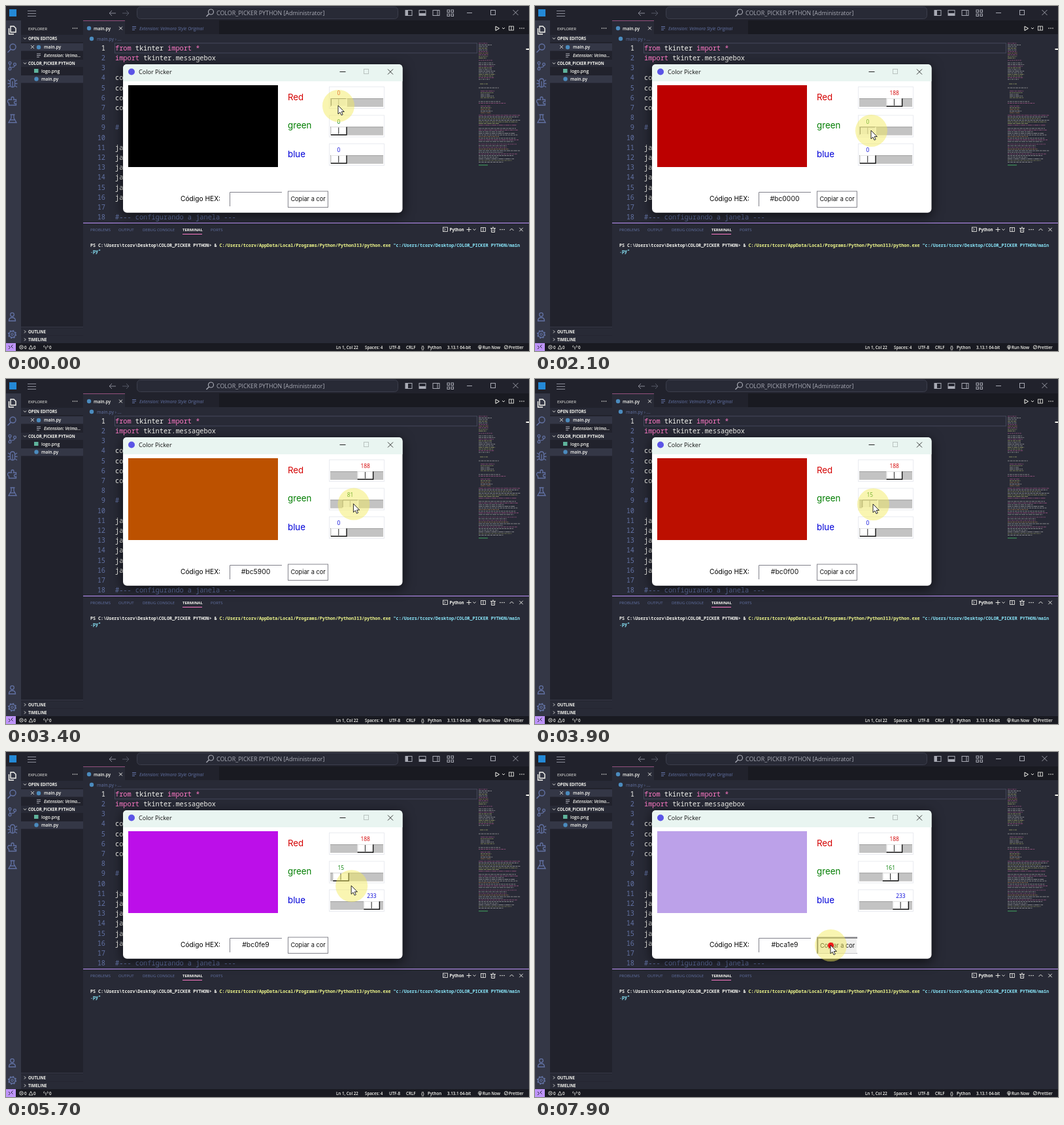
Write an HTML page that moves like this. It is 800x527 px and loops after 8000 ms.

```html
<!DOCTYPE html>
<html lang="pt">
<head>
<meta charset="utf-8">
<title>Color Picker</title>
<style>
html,body{margin:0;width:100%;height:100%;overflow:hidden;background:#282a36}
svg{display:block;width:100vw;height:100vh}
text{font-family:"Open Sans","Noto Sans",sans-serif;white-space:pre}
.mono{font-family:"Noto Sans Mono","DejaVu Sans Mono",monospace}
.app{font-family:Inter,sans-serif}
.s{font-weight:600}
.b{font-weight:700}
.i{font-style:italic}
.m{text-anchor:middle}
.e{text-anchor:end}
</style>
</head>
<body>
<svg id="stage" viewBox="0 0 800 527"></svg>
<script>
const FG = '#f8f8f2', DIM = '#6272a4', PINK = '#ff79c6', PURPLE = '#bd93f9',
      BLACK = '#191a21', DARK = '#21222c', EDITOR = '#282a36', ROW = '#343746', GREY = '#a9abb5';
const stage = document.getElementById('stage');

const rect = (x, y, w, h, fill, extra = '') =>
  `<rect x="${x}" y="${y}" width="${w}" height="${h}" fill="${fill}" ${extra}/>`;
const frame = (x, y, w, h, stroke, extra = '') => rect(x, y, w, h, 'none', `stroke="${stroke}" ${extra}`);
const text = (x, y, s, size, fill = FG, cls = '') =>
  `<text x="${x}" y="${y}" font-size="${size}" fill="${fill}" class="${cls}">${s}</text>`;
const line = (d, stroke, w = 1, extra = '') =>
  `<path d="${d}" fill="none" stroke="${stroke}" stroke-width="${w}" ${extra}/>`;
const disc = (x, y, r, fill, extra = '') => `<circle cx="${x}" cy="${y}" r="${r}" fill="${fill}" ${extra}/>`;
const ring = (x, y, r, stroke, w = 1) => disc(x, y, r, 'none', `stroke="${stroke}" stroke-width="${w}"`);
const cross = (x, y, r, stroke, w = .9) =>
  line(`M${x - r} ${y - r}l${2 * r} ${2 * r}m0 ${-2 * r}l${-2 * r} ${2 * r}`, stroke, w);
const dots = (x, y, fill = FG) => [-3, 0, 3].map(d => disc(x + d, y, .8, fill)).join('');
const chevron = (x, y) => line(`M${x - 2} ${y - 1}l2 2 2-2`, FG, .9);
const split = (x, y) => frame(x - 3.5, y - 3, 7, 6, FG, 'stroke-width=".8"') + line(`M${x} ${y - 3}v6`, FG, .8);
const pyIcon = (x, y) => disc(x, y, 3.2, '#4b8bbe');

function titleBar() {
  return rect(0, 0, 800, 22, DARK) + rect(5, 5, 11, 11, '#2489d6') +
    line('M33 7.5h13M33 11.5h13M33 15.5h13', '#8a8c98') +
    line('M168 11h-10m4-4l-4 4 4 4', '#8a8c98') + line('M178 11h10m-4-4l4 4-4 4', '#555866') +
    rect(200.5, 1.5, 399, 18, EDITOR, 'rx="5" stroke="#3c3e4c"') +
    ring(313.5, 9, 4, GREY, 1.2) + line('M310.5 12l-4 4', GREY, 1.4) +
    text(322, 14.3, 'COLOR_PICKER PYTHON [Administrator]', 8.9, GREY) +
    [611, 632, 653].map(x => frame(x, 6.5, 10, 8, GREY)).join('') +
    rect(611, 6.5, 4, 8, GREY) + rect(632, 11, 10, 4, GREY) + line('M660 6.5v8', GREY) +
    [[675, 6], [681, 6], [675, 12], [681, 12]].map(p => frame(p[0], p[1], 3.5, 3.5, GREY)).join('') +
    line('M705 10.5h8', GREY) + frame(741.5, 6.5, 7, 7, GREY) + cross(779.5, 10, 4, GREY);
}

function activityBar() {
  return rect(0, 22, 23, 493, ROW) +
    line('M7 31h5l3 3v6h-8zM4.500 34v9h7.500', FG, 1.4) +
    ring(10.5, 62.5, 4.5, DIM, 1.4) + line('M7.500 66l-5 5', DIM, 1.6) +
    ring(6, 87, 1.9, DIM, 1.2) + ring(6, 96, 1.9, DIM, 1.2) + ring(13.5, 89, 1.9, DIM, 1.2) +
    line('M6 89v5M13.500 91q0 3-7 3', DIM, 1.2) +
    line('M6.500 115q0-4 3.500-4t3.500 4v5q0 4-3.500 4t-3.500-4zM3 113l3 2m11-2l-3 2M2.500 118.500h4m7 0h4M3 124l3-2m11 2l-3-2M10 115v9', DIM, 1.3) +
    line('M4.500 143h4q-1.500-4 1.500-4t1.500 4h4v3q-3-1-3 1.500t3 1.500v2.500h-11v-3q-2-1-2-3t2-3z', DIM, 1.3) +
    line('M6.500 166h7m-5.500 0v5l-4 7h12l-4-7v-5m-6 8h8', DIM, 1.3) +
    ring(9.5, 471.5, 2.8, DIM, 1.3) + line('M4.500 481q0-5 5-5t5 5z', DIM, 1.3) +
    ring(9.5, 501.5, 4.7, DIM, 1.5) + ring(9.5, 501.5, 1.7, DIM, 1.1) +
    disc(9.5, 501.5, 5.8, 'none', `stroke="${DIM}" stroke-width="1.6" stroke-dasharray="2.2 2.35"`);
}

function sideBar() {
  const header = (y, s, open) => rect(23, y - 8, 95, 11, EDITOR) +
    (open ? chevron(29, y - 2.5) : line(`M28 ${y - 4.5}l2 2-2 2`, FG, .9)) + text(34, y, s, 6.1, FG, 'b');
  return rect(23, 22, 95, 493, DARK) + text(34, 36.5, 'EXPLORER', 6) + dots(105.5, 34) +
    rect(23, 57, 95, 11.5, ROW) + rect(23, 106, 95, 11.5, ROW) +
    header(52, 'OPEN EDITORS', 1) + cross(40.5, 62.5, 2.3, FG) + pyIcon(50, 63) +
    text(58, 65.3, 'main.py', 6.8, FG, 's') + line('M47 73h6M47 75.500h6M47 78h4', GREY) +
    text(58, 77.6, 'Extension: Velmo...', 6.6, FG, 'i s') +
    header(90, 'COLOR_PICKER PYTHON', 1) + rect(43, 96, 6.5, 6, '#5fb49c') +
    text(54, 102, 'logo.png', 6.8, FG, 's') + pyIcon(46.5, 111.5) + text(54, 114, 'main.py', 6.8, FG, 's') +
    line('M23 490.500h95M23 502.700h95', '#44475a', .7) + header(500, 'OUTLINE') + header(512, 'TIMELINE');
}

function minimap() {
  let seed = 7, out = '';
  const rand = () => (seed = seed * 16807 % 2147483647) / 2147483647;
  // [top, bottom, longest row, indent]
  const blocks = [[57, 60, 22, 0], [62, 80, 15, 0], [83, 84, 24, 0], [87, 112, 26, 0], [119, 120, 12, 2],
    [125, 126, 38, 0], [130, 141, 22, 3], [146, 150, 48, 0], [153, 163, 22, 3], [167, 184, 66, 0],
    [187, 208, 65, 0], [211, 239, 64, 0]];
  for (const [top, bottom, long, indent] of blocks)
    for (let y = top, n = 0; y <= bottom; y += 2.5, n++) {
      const w = long > 60 && n % 3 == 2 ? 25 + rand() * 30 : long * (.65 + rand() * .35);
      out += line(`M${723 + indent} ${y}h${w}`, [FG, '#f1fa8c', FG, '#ffb86c', PINK][rand() * 5 | 0], 1,
        `stroke-dasharray="${2 + rand() * 5} 1 ${1 + rand() * 3} 1" opacity=".45"`);
    }
  return out + line('M723 243h14', '#50fa7b', 1, 'opacity=".6"') + rect(795.5, 65, 4.5, 2, FG);
}

function editor() {
  const kw = s => `<tspan fill="${PINK}">${s}</tspan>`;
  const code = { 1: kw('from') + ' tkinter ' + kw('import *'), 2: kw('import') + ' tkinter.messagebox',
    9: '#', 18: '#--- configurando a janela ---' };
  let out = rect(118, 22, 682, 310, EDITOR) + rect(182, 22, 618, 21, BLACK) + rect(182, 22, 144, 21, DARK) +
    line('M118 22.500h64', PINK, 1, 'opacity=".5"') +
    pyIcon(127, 34) + text(134, 37, 'main.py', 6.8, FG, 's') + cross(175.5, 34, 2.4, FG) +
    line('M193 31.500h6M193 34h6M193 36.500h4', DIM) +
    text(204, 37, 'Extension: Velmora Style Original', 6.8, DIM, 'i') +
    line('M749 31v6.500l5.500-3.250z', FG) + chevron(761, 34) + split(773, 34) + dots(789, 34) +
    pyIcon(131, 50) + text(139, 52.7, 'main.py › ...', 7, DIM) + frame(166.5, 56.8, 554, 15, '#44475a');
  for (let n = 1; n <= 18; n++) {
    const y = 67.9 + (n - 1) * 15.19;
    const s = code[n] || (n > 3 && n < 8 ? 'co' : n > 10 && n < 17 ? 'ja' : '');
    out += text(152, y, n, 10.28, n == 1 ? FG : DIM, 'mono e') +
      text(167, y, s, 10.28, s[0] == '#' ? DIM : FG, 'mono');
  }
  return out + minimap();
}

function panel() {
  const path = 'Desktop/COLOR_PICKER PYTHON';
  const tabs = [[129, 'PROBLEMS'], [172, 'OUTPUT'], [209, 'DEBUG CONSOLE'], [270, 'TERMINAL'], [313, 'PORTS']];
  return rect(118, 331, 682, 184, EDITOR) + line('M118 331.500h682', PURPLE) +
    tabs.map(([x, s]) => text(x, 343.6, s, 6, s == 'TERMINAL' ? FG : DIM, s == 'TERMINAL' ? 'b' : '')).join('') +
    line('M270 348.500h30', PINK) +
    frame(668.5, 338, 7, 6.5, FG, 'stroke-width=".8"') + line('M670 339.500l2 2-2 2', FG, .8) +
    text(678.5, 343.8, 'Python', 6.2, FG, 'b') + line('M704.500 341.500h7m-3.500-3.500v7', FG, .9) + chevron(716.5, 341.5) +
    split(730, 341.5) + line('M741 339.500h8m-6.500 0v6h5v-6m-3.500-1.500h2m-1 3v3', FG, .9) + dots(759, 341.5) +
    line('M770.500 343l3-3 3 3', FG, .9) + cross(788, 341.5, 2.7, FG) +
    text(129, 367.8, `PS C:\\Users\\tcorv\\${path.replace('/', '\\')}&gt; &amp; ` +
      '<tspan fill="#f1fa8c">C:/Users/tcorv/AppData/Local/Programs/Python/Python313/python.exe</tspan> ' +
      `<tspan fill="#8be9fd">"c:/Users/tcorv/${path}/main</tspan>`, 6.73, FG, 'mono s') +
    text(129, 377.3, '.py"', 6.73, '#8be9fd', 'mono s');
}

function statusBar() {
  const items = [[28, '0'], [42, '0'], [66, '0'], [505, 'Ln 1, Col 22'], [549, 'Spaces: 4'], [586, 'UTF-8'],
    [612, 'CRLF'], [635, '{}'], [645, 'Python'], [675, '3.13.1 64-bit'], [729, 'Run Now'], [769, 'Prettier']];
  return rect(0, 515, 800, 12, BLACK) + rect(0, 515, 15, 12, PURPLE) +
    line('M4 519l2.500 2.500-2.500 2.500M10.500 517.500l-2.500 2.500 2.500 2.500', EDITOR) +
    ring(23.5, 521.2, 2.8, FG, .8) + cross(23.5, 521.2, 1.2, FG, .7) + line('M38 518.500l3 5.500h-6z', FG, .8) +
    line('M61 520v4.500m-2.500-6q-1.500 1.500 0 3m5-3q1.500 1.500 0 3', FG, .9) +
    ring(725, 521, 2.5, FG, .8) + disc(725, 521, .9, FG) + line('M725 521v4', FG, .9) +
    ring(765, 521.2, 2.7, FG, .8) + line('M763 523.300l4-4', FG, .8) +
    items.map(([x, s]) => text(x, 523.6, s, 6.2, FG, 's')).join('');
}

const scales = [['Red', '#d40000'], ['green', '#007d00'], ['blue', '#0000d8']];
const PITCH = 43.5;

function pickerWindow() {
  return rect(179, 89, 427.5, 226.7, '#fff', 'rx="6" style="filter:drop-shadow(0 4px 9px #000a)"') +
    line('M179 115v-20q0-6 6-6h415.500q6 0 6 6v20z', 'none', 0, 'style="fill:#e9f5f1"') +
    disc(192, 100.5, 5, '#5b54e6') + text(203, 104, 'Color Picker', 9.1, '#111') +
    line('M510.500 100.500h9', '#222') + frame(547.5, 96.5, 7, 7, '#b9c3c0') + cross(588, 100.5, 4, '#222') +
    scales.map(([s, c], i) => text(431, 143.6 + i * PITCH, s, 13.3, c, 'app') +
      frame(494.5, 123.5 + i * PITCH, 84, 33, '#e9ebf0') +
      rect(496, 141 + i * PITCH, 81, 13, '#c3c3c3') + line(`M496 ${141.5 + i * PITCH}h81`, '#a0a0a0')).join('') +
    text(267, 298.2, 'Código HEX:', 10.2, '#000', 'app') + line('M342.500 306v-21.500h79.500', '#80808a');
}

// Linear path through [time, ...values]
function follow(keys, t) {
  const i = keys.findIndex(k => k[0] > t);
  if (i < 0) return keys[keys.length - 1].slice(1);
  if (!i) return keys[0].slice(1);
  const a = keys[i - 1], b = keys[i], f = (t - a[0]) / (b[0] - a[0]);
  return a.slice(1).map((v, n) => v + (b[n + 1] - v) * f);
}

const levels = [
  [[200, 0], [1100, 139], [1400, 188]],
  [[2250, 0], [2620, 176], [2800, 176], [3820, 15], [5950, 15], [6350, 158], [6500, 161]],
  [[4500, 0], [4850, 146], [4900, 150], [5300, 233]]
];
const pointer = [[200, 508, 152], [1100, 542, 151], [1400, 553, 151], [1600, 553, 151], [2100, 514, 190],
  [2250, 514, 190], [2620, 552, 190], [2800, 552, 190], [3820, 517, 191], [4000, 517, 191], [4400, 506, 234],
  [4500, 506, 234], [4900, 540, 229], [5300, 560, 231], [5450, 560, 231], [5850, 509, 188], [5950, 509, 188],
  [6350, 541, 188], [6500, 542, 188], [6700, 542, 188], [7500, 452, 295]];
const presses = [[200, 508, 152], [2250, 514, 190], [4500, 506, 234], [5950, 509, 188], [7900, 452.5, 295.5]];
const holds = [[0, 1600, 0], [2100, 4100, 1], [4400, 5500, 2], [5850, 6750, 1]];
const LAG = 50;

const colorAt = t =>
  '#' + levels.map(k => Math.round(follow(k, t)[0]).toString(16).padStart(2, '0')).join('');

function thumb(i, value, active) {
  const x = 497 + value * .216, y = 141 + i * PITCH;
  return text(x + 12, y - 4.6, Math.round(value), 8.4, scales[i][1], 'm') +
    rect(x, y, 24, 12.5, active ? '#ececec' : '#fff') +
    line(`M${x + .5} ${y + 12}v-11.500h23.500`, active ? '#77777a' : '#e4e4e4') +
    line(`M${x} ${y + 12.2}h24v-12`, active ? '#fff' : '#111', 1.4) +
    line(`M${x + 11.8} ${y + 1}v10`, active ? '#a0a0a0' : '#222');
}

function button(down) {
  return rect(431.5, 283, 61, 24.5, down ? '#efefef' : '#fff', 'stroke="#85858d"') +
    (down ? line('M432.500 307v-23h60', '#6c6c70', 1.6) + line('M433 307h59.500v-22', '#fff') : '') +
    text(down ? 462.7 : 462, down ? 298.7 : 298, 'Copiar a cor', 9.2, '#111', 'app m');
}

function ripple([start, x, y], t) {
  const age = t - start;
  if (age < 0 || age > 550) return '';
  if (age < 100) return disc(x, y, 4.5, '#f01818');
  return disc(x, y, 4 + age / 43, '#9aa0a8', `fill-opacity=".16" stroke="#fff" stroke-opacity=".7" opacity="${1.2 - age / 600}"`);
}

function draw(t) {
  const held = holds.find(h => t >= h[0] && t < h[1]);
  const [x, y] = follow(pointer, t);
  return rect(187, 121, 229, 125, colorAt(t)) +
    levels.map((k, i) => thumb(i, follow(k, t)[0], held && held[2] == i)).join('') +
    (t > 200 ? text(382, 298.2, colorAt(t - LAG), 10.4, '#111', 'app m') : '') + button(t >= 7800) +
    disc(x + .5, y + .5, 24.5, '#f2ea5c', 'opacity=".48"') + presses.map(p => ripple(p, t)).join('') +
    `<path transform="translate(${x} ${y})" d="M0 0V13L3 10.300 5 14.800 7.200 13.800 5.200 9.500H9.300Z" fill="#fff" stroke="#111" stroke-width=".9"/>`;
}

stage.innerHTML = titleBar() + editor() + panel() + activityBar() + sideBar() + statusBar() +
  pickerWindow() + '<g id="live"></g>';
const live = document.getElementById('live');
let shown = -1;
function tick() {
  const t = Math.floor(performance.now() % 8000 / 100) * 100;
  if (t != shown) live.innerHTML = draw(shown = t);
  requestAnimationFrame(tick);
}
tick();
</script>
</body>
</html>
```
